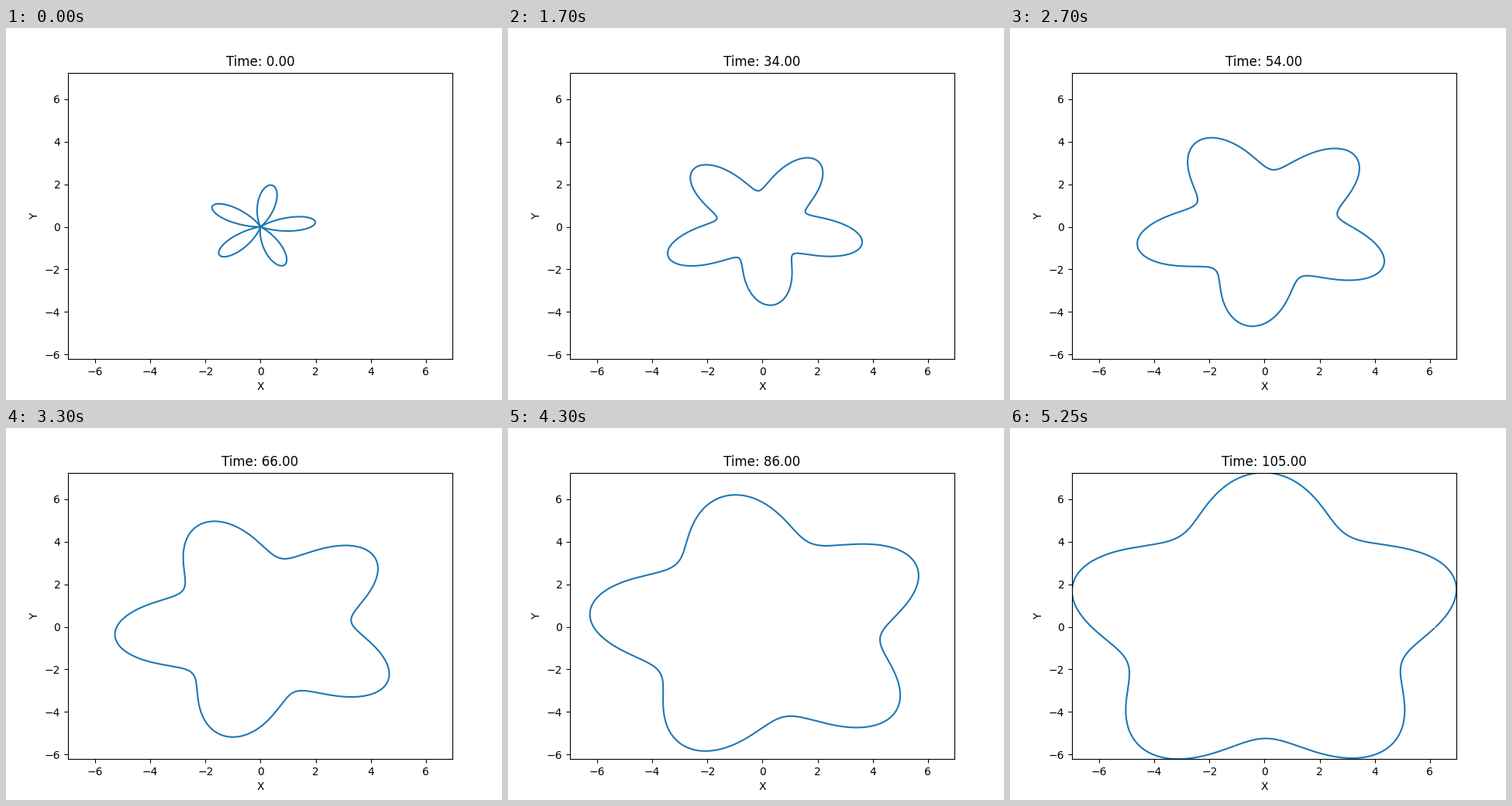
A matplotlib script that plays this animation: 640x480 px, repeating every 5300 ms.

```python
import numpy as np
import matplotlib.pyplot as plt
from matplotlib.animation import FuncAnimation

FRAMES = 106
INTERVAL = 50

theta = np.linspace(0, 2 * np.pi, 500, endpoint=False)


def flower(t):
    """Five-petal curve whose radius and phase grow together."""
    a = 1 + 0.05 * t
    r = a + np.sin(5 * theta + a)
    return r * np.cos(theta), r * np.sin(theta)


fig, ax = plt.subplots(figsize=(6.4, 4.8), dpi=100)
line, = ax.plot([], [])
title = ax.set_title("Time: 0.00")
ax.set_xlabel("X")
ax.set_ylabel("Y")

# The limits hug the largest curve.
x_end, y_end = flower(FRAMES - 1)
ax.set_xlim(x_end.min(), x_end.max())
ax.set_ylim(y_end.min(), y_end.max())


def update(t):
    line.set_data(*flower(t))
    title.set_text(f"Time: {t:.2f}")
    return line, title


anim = FuncAnimation(fig, update, frames=FRAMES, interval=INTERVAL,
                     repeat=True, repeat_delay=0, blit=False)
plt.show()
```
